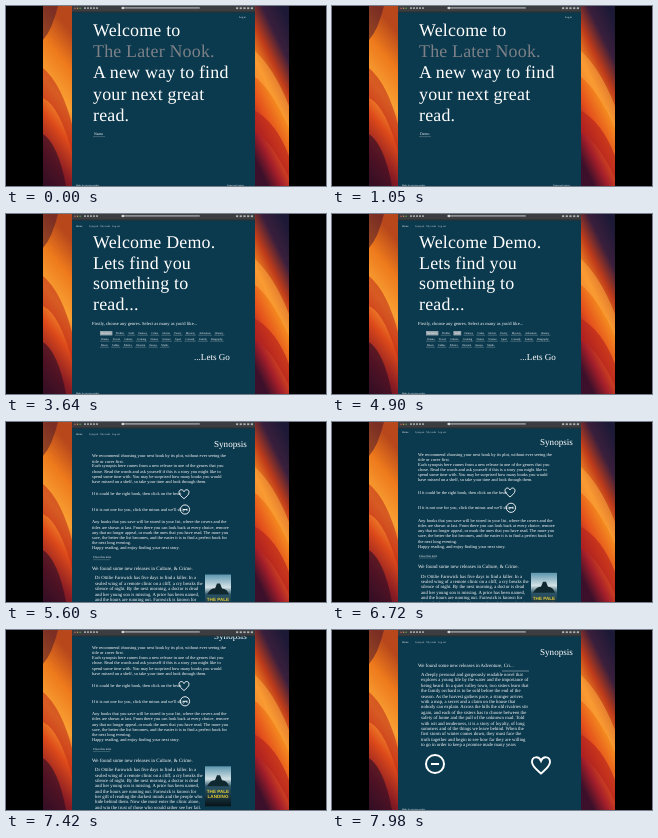
An HTML page for the animation above (8 s loop, 320 by 180 pixels).

```html
<!DOCTYPE html>
<html lang="en">
<head>
<meta charset="utf-8">
<title>Book finder walkthrough</title>
<style>
  html, body { margin: 0; width: 100%; height: 100%; overflow: hidden; background: #000; }
  svg { display: block; width: 100vw; height: 100vh; }
  text { font-family: "Liberation Serif", "Times New Roman", serif; fill: #fff; white-space: pre; text-rendering: geometricPrecision; }
  .big { font-size: 17.9px; letter-spacing: .2px; }
  .mid { font-size: 9.1px; }
  .sans { font-family: "Liberation Sans", Arial, sans-serif; }
  .icon { fill: none; stroke: #fff; }
</style>
</head>
<body>
<svg id="stage" viewBox="0 0 320 180" preserveAspectRatio="none">
  <defs>
    <linearGradient id="left" x1=".2" y1="0" x2="0" y2="1">
      <stop offset="0" stop-color="#b8481c"/><stop offset=".2" stop-color="#ee7a1c"/>
      <stop offset=".42" stop-color="#f8a033"/><stop offset=".6" stop-color="#dd4a1a"/>
      <stop offset=".8" stop-color="#8a1c24"/><stop offset="1" stop-color="#3a1024"/>
    </linearGradient>
    <linearGradient id="right" x1=".8" y1="0" x2=".4" y2="1">
      <stop offset="0" stop-color="#1b1936"/><stop offset=".2" stop-color="#3a1f3c"/>
      <stop offset=".36" stop-color="#c03c1a"/><stop offset=".52" stop-color="#f48a20"/>
      <stop offset=".7" stop-color="#e4501c"/><stop offset=".86" stop-color="#a21e2a"/>
      <stop offset="1" stop-color="#3c102a"/>
    </linearGradient>
    <linearGradient id="sky" x1="0" y1="0" x2="0" y2="1">
      <stop offset="0" stop-color="#5d96ae"/><stop offset=".32" stop-color="#d3e2e6"/>
      <stop offset=".5" stop-color="#2b5568"/><stop offset="1" stop-color="#071419"/>
    </linearGradient>
    <clipPath id="wall"><path d="M37 0H283V180H37Z"/></clipPath>
    <clipPath id="view"><path d="M66 6H249V180H66Z"/></clipPath>
  </defs>
  <rect width="320" height="180"/>
  <g clip-path="url(#wall)">
    <rect x="37" width="30" height="180" fill="url(#left)"/>
    <path d="M37 62Q56 78 67 122V150Q54 100 37 92Z" fill="#c22f1a" opacity=".6"/>
    <path d="M37 0H52Q46 24 37 34Z" fill="#4a1a2a" opacity=".55"/>
    <path d="M37 128Q52 138 60 180H37Z" fill="#2a0d26" opacity=".6"/>
    <rect x="248" width="35" height="180" fill="url(#right)"/>
    <path d="M248 44Q268 62 283 100V122Q266 84 248 70Z" fill="#ffae45" opacity=".5"/>
    <path d="M248 104Q270 116 283 150V172Q264 132 248 126Z" fill="#b3211d" opacity=".6"/>
  </g>
  <rect x="66" width="183" height="180" fill="#0b394d"/>
  <g id="pages" clip-path="url(#view)"></g>
  <g id="chrome"></g>
  <path id="pointer" d="M0 0V2.6L.7 2L1.7 2Z" fill="#fff"/>
</svg>
<script>
const NS = 'http://www.w3.org/2000/svg';
const LOOP = 8000;
const $ = id => document.getElementById(id);
const pen = document.createElement('canvas').getContext('2d');

function add(parent, tag, attrs = {}, content) {
  const el = document.createElementNS(NS, tag);
  for (const key in attrs) el.setAttribute(key, attrs[key]);
  if (content !== undefined) el.textContent = content;
  return parent.appendChild(el);
}
const group = parent => add(parent, 'g');
const big = (p, x, y, s, fill = '#fff') => add(p, 'text', { x, y, class: 'big', style: `fill:${fill}` }, s);
const mid = (p, x, y, s) => add(p, 'text', { x, y, class: 'mid' }, s);
const small = (p, x, y, size, s) => add(p, 'text', { x, y, 'font-size': size }, s);

function textWidth(s, size) {
  pen.font = '100px "Liberation Serif", "Times New Roman", serif';
  return pen.measureText(s).width * size / 100;
}

function paragraph(p, x, y, size, pitch, width, s, maxLines = 20) {
  const lines = [''];
  for (const word of s.split(' ')) {
    const last = lines.length - 1;
    const joined = (lines[last] + ' ' + word).trim();
    if (textWidth(joined, size) <= width) lines[last] = joined;
    else lines.push(word);
  }
  lines.slice(0, maxLines).forEach((line, i) => small(p, x, y + i * pitch, size, line));
}

function heart(p, x, y, r, line) {
  add(p, 'path', {
    class: 'icon', 'stroke-width': line / r, transform: `translate(${x} ${y}) scale(${r})`,
    d: 'M0 .95C-.5 .5-1 .15-1-.33C-1-.95-.25-1.05 0-.45C.25-1.05 1-.95 1-.33C1 .15 .5 .5 0 .95Z'
  });
}
function minus(p, x, y, r, line) {
  add(p, 'circle', { class: 'icon', cx: x, cy: y, r, 'stroke-width': line });
  add(p, 'path', { class: 'icon', d: `M${x - r * .45} ${y}h${r * .9}`, 'stroke-width': line });
}

function navBar(p) {
  small(p, 70, 13, 2.6, 'Home');
  small(p, 83, 13, 2.6, 'Synopsis   My reads   Log out').setAttribute('opacity', .8);
}

// Welcome page
const pages = $('pages');
const welcome = group(pages);
['Welcome to', 'The Later Nook.', 'A new way to find', 'your next great', 'read.'].forEach(
  (s, i) => big(welcome, 87, 30 + i * 21.2, s, i === 1 ? '#7d8187' : '#fff'));
small(welcome, 233, 12, 2.6, 'Log in');
const nameField = small(welcome, 88, 129, 3.8, '');
add(welcome, 'path', { d: 'M87 130.6h12', stroke: '#8fa3ad', 'stroke-width': .4 });

// Genre page
const genres = group(pages);
navBar(genres);
['Welcome Demo.', 'Lets find you', 'something to', 'read...'].forEach(
  (s, i) => big(genres, 87, 34 + i * 20.6, s));
small(genres, 86, 110.5, 4.6, "Firstly, choose any genres. Select as many as you'd like...");
const tagRows = [
  'Romance Thriller SciFi Fantasy Crime Horror Poetry Mystery Adventure History',
  'Drama Travel Culture Cooking Nature Science Sport Comedy Family Biography',
  'Music Fables Politics Western Essays Myths'
];
const marks = [];
tagRows.forEach((row, r) => {
  let x = 94;
  const y = 117 + r * 6;
  for (const word of row.split(' ')) {
    const w = textWidth(word, 2.75) + 2;
    marks.push(add(genres, 'rect', { x, y, width: w, height: 4.2, fill: '#96a5ac', opacity: 0 }));
    small(genres, x + 1, y + 3, 2.75, word);
    add(genres, 'path', { d: `M${x} ${y + 4.2}h${w}`, stroke: '#9fb2bb', 'stroke-width': .4 });
    x += w + 2.3;
  }
});
mid(genres, 188, 145.5, '...Lets Go');

// Synopsis page
const synopsis = group(pages);
navBar(synopsis);
mid(synopsis, 208, 25, 'Synopsis');
const body = (y, s) => paragraph(synopsis, 86, y, 4.4, 5.2, 138, s);
body(35.5, 'We recommend choosing your next book by its plot, without ever seeing the title or cover first.');
body(45.5, 'Each synopsis here comes from a new release in one of the genres that you chose. Read the words and ask yourself if this is a story you might like to spend some time with. You may be surprised how many books you would have missed on a shelf, so take your time and look through them.');
body(73.5, 'If it could be the right book, then click on the heart');
body(88.8, "If it is not one for you, click the minus and we'll skip it");
body(101.5, 'Any books that you save will be stored in your list, where the covers and the titles are shown at last. From there you can look back at every choice, remove any that no longer appeal, or mark the ones that you have read. The more you save, the better the list becomes, and the easier it is to find a perfect book for the next long evening.');
body(127.5, 'Happy reading, and enjoy finding your next story.');
heart(synopsis, 178, 72, 5, .9);
minus(synopsis, 179, 87.5, 4.6, .9);
small(synopsis, 87, 136.5, 3, 'Close this intro');
add(synopsis, 'path', { d: 'M87 137.7h17', stroke: '#9fb2bb', 'stroke-width': .3 });
small(synopsis, 86, 148, 5, 'We found some new releases in Culture, & Crime.');
paragraph(synopsis, 89, 157.5, 4.75, 5.35, 108,
  'Dr Ottilie Farnwick has five days to find a killer. In a sealed wing of a remote clinic on a cliff, a cry breaks the silence of night. By the next morning, a doctor is dead and her young son is missing. A price has been named, and the hours are running out. Farnwick is known for her gift of reading the darkest minds and the people who hide behind them. Now she must enter the clinic alone, and win the trust of those who would rather see her fail.');
const cover = add(synopsis, 'g', { transform: 'translate(199 152.5)' });
add(cover, 'rect', { width: 26, height: 40, fill: 'url(#sky)' });
add(cover, 'path', { d: 'M2 20Q6 13 10 14L12 9H15L17 14Q22 14 24 20Z', fill: '#102830' });
['THE PALE', 'LANDING'].forEach((s, i) => add(cover, 'text', {
  x: 13, y: 27 + i * 5, 'text-anchor': 'middle', class: 'sans', 'font-size': 4.6,
  'font-weight': 'bold', style: 'fill:#e7cf35'
}, s));

// Next suggestion
const next = group(pages);
navBar(next);
mid(next, 208, 25, 'Synopsis');
small(next, 86, 36.5, 4.9, 'We found some new releases in Adventure, Cri...');
add(next, 'path', { d: 'M170 41h27', stroke: '#c8d3d8', 'stroke-width': .5 });
paragraph(next, 89, 46, 4.75, 5.4, 108,
  'A deeply personal and gorgeously readable novel that explores a young life by the water and the importance of being heard. In a quiet valley town, two sisters learn that the family orchard is to be sold before the end of the season. As the harvest gathers pace, a stranger arrives with a map, a secret and a claim on the house that nobody can explain. Across the hills the old rivalries stir again, and each of the sisters has to choose between the safety of home and the pull of the unknown road. Told with wit and tenderness, it is a story of loyalty, of long summers and of the things we leave behind. When the first storm of winter comes down, they must face the truth together and begin to see how far they are willing to go in order to keep a promise made many years before they were born, and that was never forgotten.', 14);
minus(next, 103, 134, 9, 2);
heart(next, 209, 135, 9, 1.9);

const footer = group(pages);
small(footer, 70, 179.5, 2.3, 'Made for curious readers');
const footerEnd = small(footer, 221, 179.5, 2.3, 'Terms and contact');

// Browser bar
const bar = $('chrome');
add(bar, 'rect', { x: 66, width: 183, height: 6.3, fill: '#3b3d40' });
add(bar, 'rect', { x: 115, y: 1, width: 79, height: 1.8, rx: .9, fill: '#8c8f92' });
add(bar, 'circle', { cx: 117, cy: 2, r: 1.2, fill: '#d8d8d8' });
['#c9605a', '#c7a24c', '#5d9d58'].forEach((fill, i) => add(bar, 'circle', { cx: 69 + i * 2.6, cy: 2.2, r: .8, fill }));
for (let i = 0; i < 5; i++) {
  add(bar, 'rect', { x: 78 + i * 3, y: 1.3, width: 2, height: 1.6, fill: '#a5a7a9' });
  add(bar, 'rect', { x: 230 + i * 3.7, y: 1.3, width: 2.2, height: 1.8, fill: '#b0b2b4' });
}
add(bar, 'path', { d: 'M66 6h183', stroke: '#20262a', 'stroke-width': .6 });

const ramp = (t, a, b) => Math.min(1, Math.max(0, (t - a) / (b - a)));
const smooth = (t, a, b) => { const k = ramp(t, a, b); return k * k * (3 - 2 * k); };
const typing = [[840, 'Demo'], [560, 'Dem'], [490, 'De'], [420, 'D'], [0, 'Name']];
// start, end, from x, y, to x, y
const pointerMoves = [[2100, 2240, 95, 117, 96, 118], [6230, 6510, 154, 132, 161, 138]];

function fade(el, level) {
  el.setAttribute('opacity', level);
  el.style.display = level > 0 ? '' : 'none';
}

function draw(t) {
  fade(welcome, 1 - smooth(t, 1470, 1680));
  fade(genres, smooth(t, 1680, 1960) * (1 - smooth(t, 5110, 5250)));
  fade(synopsis, smooth(t, 5250, 5460) * (1 - smooth(t, 7560, 7740)));
  fade(next, smooth(t, 7740, 7960));
  fade(footer, t < 5110 ? 1 : ramp(t, 7740, 7960));
  fade(footerEnd, 1 - ramp(t, 1050, 1330));

  nameField.textContent = typing.find(step => t >= step[0])[1];
  marks[0].setAttribute('opacity', smooth(t, 2520, 2800));
  marks[2].setAttribute('opacity', ramp(t, 3990, 4060));

  const scroll = smooth(t, 5600, 6090) + .7 * ramp(t, 6650, 6720) + 15.1 * ramp(t, 6720, 7450);
  synopsis.setAttribute('transform', `translate(0 ${-scroll})`);

  const move = pointerMoves.find(m => t >= m[0] && t < m[1]);
  fade($('pointer'), move ? .8 : 0);
  if (move) {
    const [a, b, x0, y0, x1, y1] = move, k = smooth(t, a, b);
    $('pointer').setAttribute('transform', `translate(${x0 + (x1 - x0) * k} ${y0 + (y1 - y0) * k})`);
  }
}

const start = performance.now();
function tick() {
  draw((performance.now() - start) % LOOP);
  requestAnimationFrame(tick);
}
tick();
</script>
</body>
</html>
```
